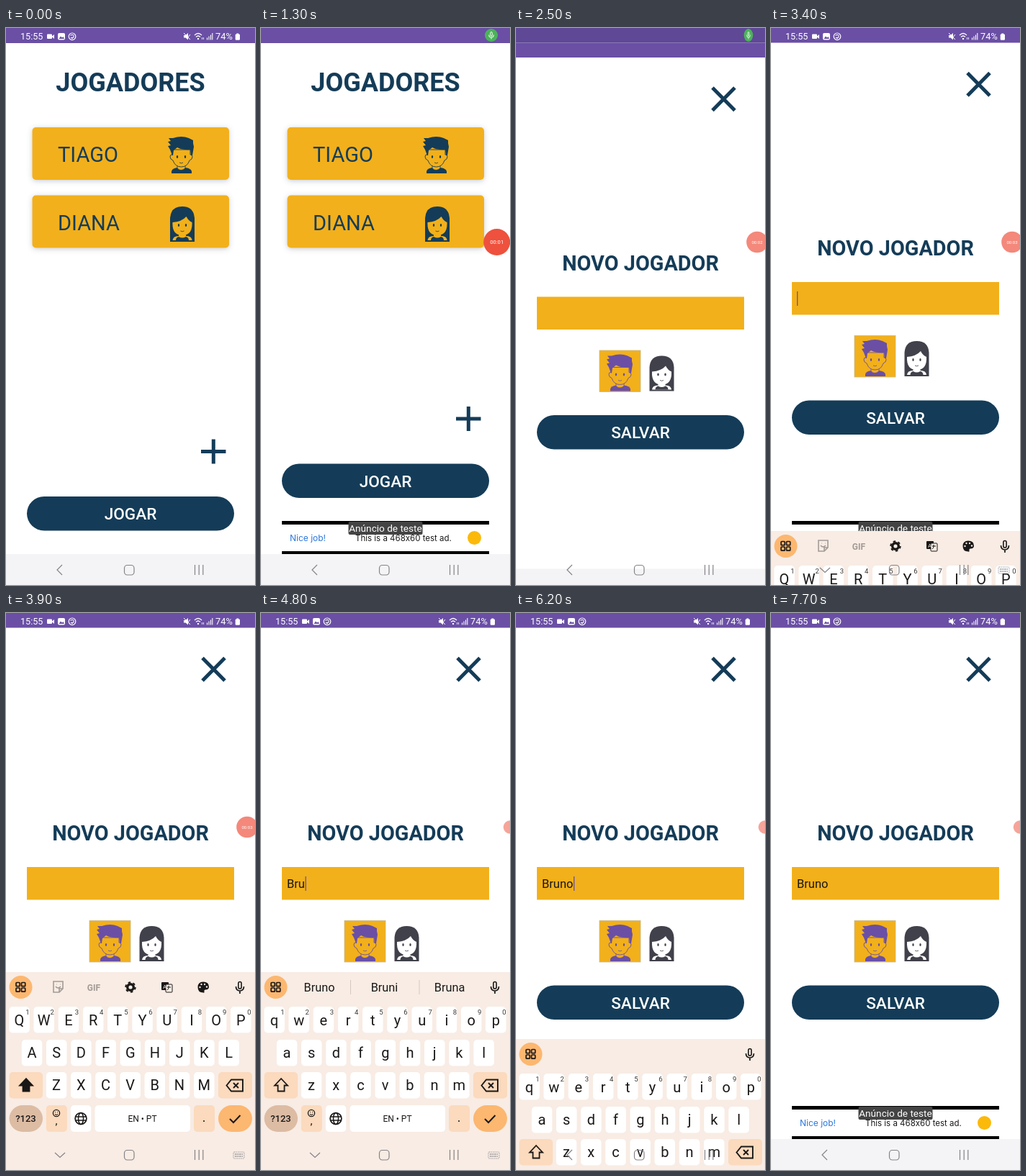
Recreate the animation shown at these times as an HTML page. Size 346x774 px, loop 8 s.

```html
<!DOCTYPE html>
<html lang="pt">
<head>
<meta charset="utf-8">
<title>Jogadores</title>
<style>
html, body { margin: 0; width: 100%; height: 100%; overflow: hidden; background: #fff; }
svg { display: block; width: 346px; height: 774px; font-family: Roboto, sans-serif; }
.ad { font-family: Inter, sans-serif; }
</style>
</head>
<body>
<svg id="stage" viewBox="0 0 346 774" xmlns="http://www.w3.org/2000/svg"></svg>
<script>
const LOOP = 8000, STEP = 100;
const NAVY = '#143c58', GOLD = '#f2b01a', PURPLE = '#6a4fa5', INK = '#1a1817',
  SLATE = '#41414b', PEACH = '#fbdabd', ORANGE = '#fcb770', BOARD = '#f8ece4';
const NAME = 'Bruno', HINTS = ['Bruno', 'Bruni', 'Bruna'];
const KEYS = [4200, 4500, 4700, 4900, 5200];
const FOCUS = 3400, CLOSE = 6000;

const rect = (x, y, w, h, fill, r = 0, extra = '') =>
  `<rect x="${x}" y="${y}" width="${w}" height="${h}" rx="${r}" fill="${fill}" ${extra}/>`;
const circle = (x, y, r, fill, extra = '') => `<circle cx="${x}" cy="${y}" r="${r}" fill="${fill}" ${extra}/>`;
const oval = (x, y, rx, ry, fill, extra = '') =>
  `<ellipse cx="${x}" cy="${y}" rx="${rx}" ry="${ry}" fill="${fill}" ${extra}/>`;
const path = (d, fill, extra = '') => `<path d="${d}" fill="${fill}" ${extra}/>`;
const line = (d, color, w = 1, extra = '') => path(d, 'none', `stroke="${color}" stroke-width="${w}" ${extra}`);
const text = (s, x, y, size, fill, extra = '') =>
  `<text x="${x}" y="${y}" font-size="${size}" fill="${fill}" ${extra}>${s}</text>`;
const mid = (s, x, y, size, fill, extra = '') => text(s, x, y, size, fill, 'text-anchor="middle" ' + extra);
const group = (id, body) => `<g id="${id}">${body}</g>`;
const move = (x, y, body) => `<g transform="translate(${x} ${y})">${body}</g>`;
const title = (s, y, size) => mid(s, 173, y, size, NAVY, 'font-weight="700"');

const face = (x, y, gap, color) =>
  oval(x - gap, y, 1.2, 2.1, color) + oval(x + gap, y, 1.2, 2.1, color) +
  line(`M${x - 2.5} ${y + 8}q2.5 1.8 5 0`, color, .8);

const boy = (color, skin) =>
  path('M6 51v-3q1-4 8-5h11q8 1 9 5v3z', color) +
  path('M14 40v4q5 5 11 0v-4z', skin, `stroke="${color}" stroke-width=".8"`) +
  path('M7 18v7q-3-.5-3 3t4 5q3 9 11.500 9t11.500-9q4-1.500 4-5t-3-3v-7z', skin,
    `stroke="${color}" stroke-width=".9"`) +
  path('M7 26L4 18 1 13l4-1-4-5 4-1-3-4h6Q20-2 30 2l6 3 0 4 1 5-2 12h-2l-1-8q-10 1-18-3l-5 4-1 7z', color) +
  face(19.5, 28, 5.5, color);

const girl = (color, skin) =>
  path('M0 49V16Q1 0 17 0t17 16v33z', color) +
  path('M12 37v4q-8 0-8.500 6h27q-.5-6-8.500-6v-4z', skin) +
  path('M8 47q0-4 4-5 5 3 10 0 4 1 4 5z', color) +
  path('M3.500 22q13-1 19-8 3 6 8 8 1 18-13.500 18T3.500 22z', skin) +
  face(17, 26, 5, color);

const button = (label, y) =>
  rect(29, y, 288, 47.5, NAVY, 24) + mid(label, 173, y + 32, 22.6, '#fff', 'font-weight="500"');

const card = (name, y) =>
  rect(36.500, y, 273.500, 73, GOLD, 5, 'filter="url(#shade)"') + text(name, 72, y + 48, 29, NAVY);

const players =
  rect(0, 0, 346, 774, '#fff') + rect(0, 731, 346, 43, '#f4f4f6') +
  title('JOGADORES', 88, 36) +
  card('TIAGO', 138) + move(224, 151, boy(NAVY, GOLD)) +
  card('DIANA', 232.5) + move(228, 248, girl(NAVY, GOLD)) +
  group('footer', line('M271 588.500h34.500M288.300 571.500v34', NAVY, 5) + button('JOGAR', 651));

const form =
  rect(0, 0, 346, 774, '#fff') + rect(0, 0, 346, 20.5, PURPLE) + rect(0, 731, 346, 43, '#f4f4f6') +
  line('M273 62.500l31 31.500M304 62.500l-31 31.500', NAVY, 5) +
  title('NOVO JOGADOR', 316, 28.8) +
  rect(29, 353, 288, 45.5, GOLD) +
  text('', 36, 382, 16.5, INK, 'id="typed"') +
  rect(77, 366, 1.3, 20, PURPLE, 0, 'id="caret"') +
  rect(116, 427.5, 57, 57.5, GOLD, 0, 'stroke="#c9b98c" stroke-width=".8"') +
  move(125, 433, boy(PURPLE, GOLD)) + move(185.5, 435, girl(SLATE, '#fff')) +
  button('SALVAR', 517.5);

const banner =
  rect(29, 685, 288, 46, '#000') + rect(29, 690, 288, 37, '#fff') +
  text('Nice job!', 40, 713, 12, '#2a76dc', 'class="ad"') +
  text('This is a 468x60 test ad.', 131, 713, 11.5, INK, 'class="ad"') +
  circle(296.5, 708.5, 9.5, '#fbb90a') +
  rect(121.500, 686, 103, 18, '#444', 2) + mid('Anúncio de teste', 173, 700, 13.6, '#fff');

function letters(upper) {
  const row = (chars, x, y) => [...chars].map((c, i) =>
    mid(upper ? c.toUpperCase() : c, x + 34.2 * i, y, 20, INK)).join('');
  return row('qwertyuiop', 18.5, 573) + row('asdfghjkl', 36, 618) + row('zxcvbnm', 70, 663) +
    path('M28 647l9 9.500h-4.500v8h-9v-8H19z', upper ? INK : 'none', `stroke="${INK}" stroke-width="1.8"`);
}

function keyCaps() {
  let out = '';
  [[10, 18.5, 547], [9, 36, 593], [7, 70, 638]].forEach(([n, x, y]) => {
    for (let i = 0; i < n; i++) out += rect(x - 14.2 + 34.2 * i, y, 28.5, 36.5, '#fff', 5);
  });
  for (let i = 0; i < 10; i++) out += mid((i + 1) % 10, 30 + 34.2 * i, 558, 9.5, '#3a3634');
  return out;
}

const mic = (x, y, color, s = 1) => `<g transform="translate(${x} ${y}) scale(${s})">` +
  rect(-2.1, -7.5, 4.2, 9.5, 'none', 2.1, `stroke="${color}" stroke-width="1.6"`) +
  line('M-5.500-1q0 6 5.500 6t5.500-6M0 5v4', color, 1.7) + '</g>';

const grid = [[14, 513.5], [21.500, 513.5], [14, 521], [21.500, 521]]
  .map(([x, y]) => rect(x, y, 5.2, 5.2, 'none', 1, `stroke="${INK}" stroke-width="1.7"`)).join('');

const tools =
  line('M66 512h13v10l-5 5h-8zM74 527v-5h5M69 519q3 4 7 0M70 516h.5M75 516h.5', '#a39b96', 1.6) +
  mid('GIF', 122, 524.5, 12, '#a39b96', 'font-weight="700"') +
  circle(173, 520, 4.3, 'none', `stroke="${INK}" stroke-width="3.4"`) +
  circle(173, 520, 6.7, 'none', `stroke="${INK}" stroke-width="2" stroke-dasharray="3.500"`) +
  rect(216, 513, 10, 11, INK, 1) + rect(222, 516, 9, 11, BOARD, 1, `stroke="${INK}"`) +
  mid('A', 220.5, 521.5, 8, BOARD) + line('M224 520h5M226 518v2q0 3-2 4', INK) +
  path('M274 512.500q8 0 8 7 0 4-5 4-2 0-1.500 2.500t-1.500 1.500q-7.500 0-7.500-7.500t7.500-7.500z', INK) +
  [[269.500, 520], [271.5, 516], [276, 516], [279, 519.500]].map(([x, y]) => circle(x, y, 1.2, BOARD)).join('');

const hints = HINTS.map((s, i) => mid(s, 81 + 90.500 * i, 526, 16.3, INK)).join('') +
  line('M124.500 510v20M220 510v20', '#d5c8c0');

const keyboard =
  rect(0, 499, 346, 275, BOARD) + circle(20.5, 520, 16, ORANGE) + grid + mic(325, 520, INK) +
  group('tools', tools) + group('hints', hints) + keyCaps() +
  rect(4.5, 638, 46.5, 36.5, PEACH, 5) + rect(295, 638, 47, 36.5, PEACH, 5) +
  group('upper', letters(true)) + group('lower', letters(false)) +
  line('M306.500 656.500l6.500-8h16v16h-16zM316 653l7 7M323 653l-7 7', INK, 1.9) +
  rect(4.5, 684, 46.5, 37, '#ddbca4', 18.5) + mid('?123', 27.5, 707, 13, INK, 'font-weight="500"') +
  rect(55.800, 684, 29, 37, PEACH, 5) +
  circle(70, 695, 4.6, 'none', `stroke="${INK}" stroke-width="1.3"`) +
  line('M68 696q2 3 4 0M68 693.500h1M71 693.500h1', INK, 1.2) + mid(',', 70, 711, 15, INK) +
  rect(89.8, 684, 28.5, 37, '#fff', 5) +
  circle(104, 702.500, 7.9, 'none', `stroke="${INK}" stroke-width="1.7"`) +
  oval(104, 702.5, 3.5, 7.9, 'none', `stroke="${INK}" stroke-width="1.5"`) +
  line('M96.500 700h15M96.500 705h15', INK, 1.5) +
  rect(123.500, 684, 132.500, 37, '#fff', 5) + mid('EN • PT', 189.5, 707, 12, INK) +
  rect(261, 684, 29, 37, PEACH, 5) + mid('.', 275, 707, 18, INK) +
  rect(295, 684, 47, 37, ORANGE, 18.5) + line('M311 703l5 5 9.500-10', INK, 2);

const GREY = '#858388';
const nav =
  group('back', line('M78 746l-7 7 7 7', GREY, 1.2)) +
  group('down', line('M68 750l7 6.500 7-6.500', GREY, 1.2) +
    rect(316, 749, 15, 9, 'none', 1, `stroke="${GREY}" stroke-width=".8" stroke-dasharray="1.500 1"`) +
    line('M318 752h11M318 755h11', GREY, 1.3, 'stroke-dasharray="1.500 1"')) +
  rect(164.5, 746.5, 13.5, 13.5, 'none', 4, `stroke="${GREY}" stroke-width="1.2"`) +
  line('M262.500 746v14M268.200 746v14M273.800 746v14', GREY, 1.2);

const icons =
  text('15:55', 20, 16, 12.6, '#fff') +
  rect(57, 8.5, 7, 6.5, '#fff', 1) + path('M64 11.500l3-2.500v6l-3-2.500z', '#fff') +
  rect(72, 7, 10, 9.5, '#fff', 2) + path('M73.500 15l2.500-3.500 2 2 1.500-1.500 1.500 3z', PURPLE) +
  circle(92, 11.8, 4.8, 'none', 'stroke="#fff" stroke-width="1.2"') +
  line('M89.500 10.500q2.500-2 5 0M90 13l2 1.500 2.500-3', '#fff', 1.2) +
  path('M247 10h2.500l3.500-3v9.500l-3.500-3H247z', '#fff') + line('M247 7l9 9M256 9l-4 5', '#fff') +
  line('M262 10q5-5 10 0M264 12.500q3-3 6 0', '#fff', 1.2) + circle(267, 15, 1.2, '#fff') +
  line('M272.500 13v3M274.500 13v3', '#fff', .8) +
  line('M279.500 16.500v-3M282 16.500v-5M284.500 16.500v-7M286.800 16.500v-9.500', '#fff', 1.1) +
  text('74%', 291, 16, 12.8, '#fff') +
  rect(318.7, 8.5, 6.3, 8.3, '#fff', 1.2) + rect(320.4, 7.5, 2.8, 2, '#fff');

const stage = document.getElementById('stage');
stage.innerHTML =
  `<defs><filter id="shade" x="-10%" y="-20%" width="120%" height="150%">
    <feDropShadow dx="0" dy="1.5" stdDeviation="3.5" flood-color="#456" flood-opacity=".3"/></filter></defs>` +
  group('players', players) + rect(0, 0, 346, 21, PURPLE, 0, 'id="strip"') +
  group('form', form) + group('banner', banner) + group('board', keyboard) + nav +
  group('icons', icons) +
  group('rec', circle(0, 0, 9, '#4bb35a') + mic(0, 0, '#fff', .6)) +
  group('bubble', circle(0, 0, 18.5, '#ee513d') + mid('', 0, 2.8, 7.6, '#fff', 'id="clock"'));

const el = {};
stage.querySelectorAll('[id]').forEach(n => el[n.id] = n);
const show = (id, on) => el[id].setAttribute('display', on ? 'inline' : 'none');
const place = (id, x, y, sx = 1, sy = sx) =>
  el[id].setAttribute('transform', `translate(${x} ${y}) scale(${sx} ${sy})`);
const fade = (id, v) => el[id].setAttribute('opacity', v);

// Linear value from a list of [time, value] pairs
function at(t, steps) {
  const i = steps.findIndex(s => s[0] > t);
  if (i < 0) return steps[steps.length - 1][1];
  if (!i) return steps[0][1];
  const [a, v] = steps[i - 1], [b, w] = steps[i];
  return v + (w - v) * (t - a) / (b - a);
}

function draw(t) {
  const onForm = t >= 2400;
  show('players', t < 2500);
  show('form', onForm);
  place('form', 0, at(t, [[2400, 48], [2500, 20.5], [2600, 7], [2700, 2], [2800, 0]]));
  fade('form', at(t, [[2400, .5], [2500, 1]]));
  el.strip.setAttribute('fill', onForm ? '#5f4896' : PURPLE);

  const loaded = t >= 1000;
  place('footer', 0, loaded ? -45.5 : 0);
  show('banner', loaded && t < 2400 || t >= 3000);

  show('icons', t < 300 || t >= 2700);
  fade('icons', at(t, [[100, 1], [300, 0], [2600, 0], [2900, 1]]));
  show('rec', t >= 300 && t < 2700);
  place('rec', at(t, [[2400, 320], [2500, 323]]), 10,
    at(t, [[300, .4], [500, 1], [2400, 1], [2500, .7], [2700, .2]]),
    at(t, [[300, .4], [500, 1], [2500, 1], [2700, .2]]));

  show('bubble', t >= 500);
  place('bubble', at(t, [[2000, 327.7], [2200, 335], [4200, 335], [4500, 346]]), 297.5,
    at(t, [[1900, 1], [2200, .8], [4200, .8], [4500, .5]]));
  fade('bubble', at(t, [[1900, 1], [2200, .68], [4200, .68], [4500, .52]]));
  el.clock.textContent = t < 4400 ? '00:0' + Math.floor(t / 1000) : '';

  const count = KEYS.filter(k => t >= k).length;
  el.typed.textContent = NAME.slice(0, count);
  const last = count ? KEYS[count - 1] : FOCUS;
  show('caret', t >= FOCUS && Math.floor((t - last) / 500) % 2 === 0);
  el.caret.setAttribute('x', count ? 36.5 + el.typed.getComputedTextLength() : 36);

  show('board', t >= FOCUS && t < 6600);
  place('board', 0, at(t, [[3400, 200], [3500, 90], [3600, 30], [3700, 0],
    [CLOSE, 0], [6100, 30], [6200, 93], [6300, 175], [6400, 240], [6500, 275]]));
  show('tools', !count);
  show('hints', count && t < CLOSE);
  show('upper', !count);
  show('lower', count);
  const typing = t >= FOCUS && t < CLOSE;
  show('down', typing);
  show('back', !typing);
}

const start = performance.now();
function tick() {
  const t = (performance.now() - start) % LOOP;
  draw(Math.floor(t / STEP) * STEP);
  requestAnimationFrame(tick);
}
tick();
</script>
</body>
</html>
```
